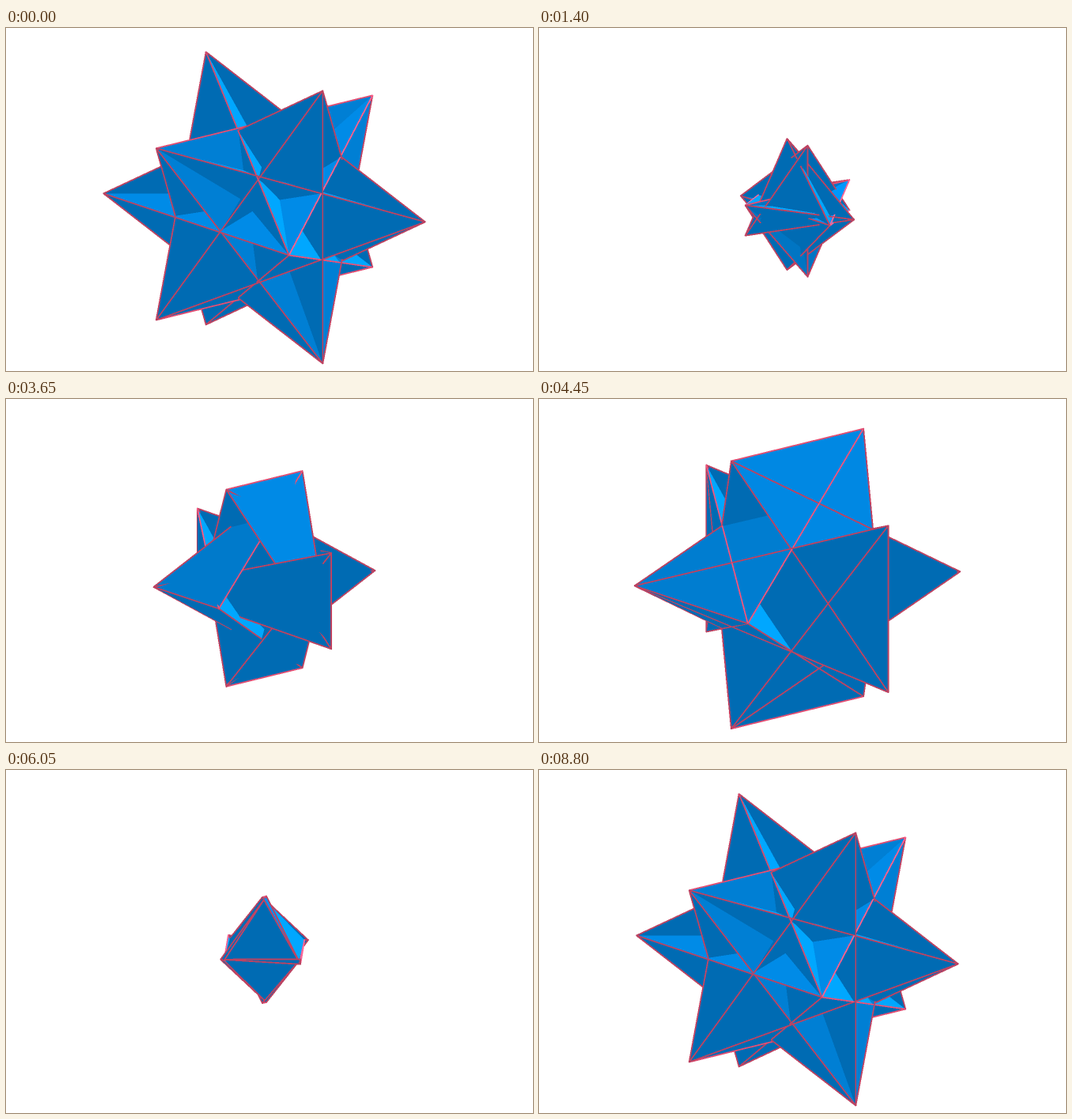
An HTML page with a canvas that plays this animation: 666 by 434 pixels, repeating every 8.85 s.

```html
<!DOCTYPE html>
<html>
<head>
<meta charset="utf-8">
<style>
html, body { margin: 0; width: 100%; height: 100%; overflow: hidden; background: #fff; }
canvas { display: block; width: 666px; height: 434px; }
</style>
</head>
<body>
<canvas id="stage" width="666" height="434"></canvas>
<script>
const W = 666, H = 434, SS = 2;
const FRAME_MS = 50, FRAMES = 177, TURN = 88;
const P_START = -1.7, P_STEP = 0.05;
const CENTER = [326.5, 227.4], SCALE = 66.7;
const LINE_WIDTH = 1.8, LINE_BIAS = 2;
const FACE_COLOR = [0, 153, 255], LINE_COLOR = [270, 95, 140];
const LIGHT = [0.36, 0, 0.36], AMBIENT = 0.7, MAX_LEVEL = 1.09;
const SIGNS = [-1, 1];

const az = 40.6 * Math.PI / 180, el = 16.6 * Math.PI / 180;
const RIGHT = [Math.cos(az), Math.sin(az), 0];
const DOWN = [-Math.sin(el) * Math.sin(az), Math.sin(el) * Math.cos(az), -Math.cos(el)];
const VIEW = [-Math.cos(el) * Math.sin(az), Math.cos(el) * Math.cos(az), Math.sin(el)];

const view = document.getElementById("stage").getContext("2d");
view.imageSmoothingQuality = "high";
const buffer = document.createElement("canvas");
const BW = buffer.width = W * SS, BH = buffer.height = H * SS;
const bufferCtx = buffer.getContext("2d");
const image = bufferCtx.createImageData(BW, BH);
const pixels = new Uint32Array(image.data.buffer);
const depth = new Float32Array(BW * BH);

function dot(a, b) {
  return a[0] * b[0] + a[1] * b[1] + a[2] * b[2];
}

function project(v) {
  return [
    SS * (CENTER[0] + SCALE * dot(v, RIGHT)),
    SS * (CENTER[1] + SCALE * dot(v, DOWN)),
    SS * SCALE * dot(v, VIEW)
  ];
}

// A point on an extended octahedron edge: axis i and the axis before it.
function vertex(p, i, s, t) {
  const v = [0, 0, 0];
  v[i] = (1 - p) * s;
  v[(i + 2) % 3] = p * t;
  return v;
}

// Packed color of a surface whose normal is turned towards the viewer.
function shade(color, normal) {
  const side = Math.sign(dot(normal, VIEW)) / (Math.hypot(...normal) || 1);
  const level = Math.min(MAX_LEVEL, AMBIENT + Math.max(0, dot(normal, LIGHT) * side));
  const [r, g, b] = color.map(c => Math.min(255, Math.round(c * level)));
  return (255 << 24 | b << 16 | g << 8 | r) >>> 0;
}

// Depth-tested fill of a flat convex polygon.
function fill(points, color, bias) {
  const [a, b, c] = points;
  const ux = b[0] - a[0], uy = b[1] - a[1], uz = b[2] - a[2];
  const vx = c[0] - a[0], vy = c[1] - a[1], vz = c[2] - a[2];
  const area = ux * vy - uy * vx;
  if (Math.abs(area) < 1e-3) return;
  const gx = (uz * vy - uy * vz) / area;
  const gy = (ux * vz - uz * vx) / area;
  const ys = points.map(q => q[1]);
  const top = Math.max(0, Math.ceil(Math.min(...ys) - 0.5));
  const bottom = Math.min(BH - 1, Math.floor(Math.max(...ys) - 0.5));
  for (let y = top; y <= bottom; y++) {
    const cy = y + 0.5;
    let left = Infinity, right = -Infinity;
    for (let i = 0; i < points.length; i++) {
      const m = points[i], n = points[(i + 1) % points.length];
      if ((m[1] <= cy) === (n[1] <= cy)) continue;
      const x = m[0] + (cy - m[1]) / (n[1] - m[1]) * (n[0] - m[0]);
      left = Math.min(left, x);
      right = Math.max(right, x);
    }
    const x0 = Math.max(0, Math.ceil(left - 0.5));
    const x1 = Math.min(BW - 1, Math.ceil(right - 0.5) - 1);
    let z = a[2] + gx * (x0 + 0.5 - a[0]) + gy * (cy - a[1]) + bias;
    for (let x = x0, k = y * BW + x0; x <= x1; x++, k++, z += gx) {
      if (z > depth[k]) {
        depth[k] = z;
        pixels[k] = color;
      }
    }
  }
}

function drawFace(vertices, normal) {
  fill(vertices.map(project), shade(FACE_COLOR, normal), 0);
}

// An edge is lit like a thin rod seen from the front.
function drawEdge(from, to) {
  const a = project(from), b = project(to);
  const dx = b[0] - a[0], dy = b[1] - a[1], length = Math.hypot(dx, dy);
  if (length < 1e-3) return;
  const along = to.map((c, i) => c - from[i]);
  const slant = dot(along, VIEW) / dot(along, along);
  const normal = VIEW.map((c, i) => c - slant * along[i]);
  const half = SS * LINE_WIDTH / 2;
  const ex = dx / length * half, ey = dy / length * half;
  const corner = (q, end, side) =>
    [q[0] + end * ex * 0.6 - side * ey, q[1] + end * ey * 0.6 + side * ex, q[2]];
  fill([corner(a, -1, -1), corner(a, -1, 1), corner(b, 1, 1), corner(b, 1, -1)],
    shade(LINE_COLOR, normal), SS * LINE_BIAS);
}

function drawSolid(p) {
  const edges = [];

  for (const x of SIGNS) for (const y of SIGNS) for (const z of SIGNS) {
    const s = [x, y, z];
    const face = s.map((sign, i) => vertex(p, i, sign, s[(i + 2) % 3]));
    drawFace(face, s);
    face.forEach((v, i) => edges.push([v, face[(i + 1) % 3]]));
  }

  for (let i = 0; i < 3; i++) for (const t of SIGNS) {
    const base = SIGNS.map(s => vertex(p, i, s, t));
    edges.push(base);
    for (const s of SIGNS) {
      const normal = [0, 0, 0];
      normal[(i + 1) % 3] = (2 * p - 1) * s;
      normal[(i + 2) % 3] = p * t;
      drawFace([...base, vertex(p, (i + 2) % 3, t, s)], normal);
    }
  }

  edges.forEach(([a, b]) => drawEdge(a, b));
}

function render(frame) {
  const step = frame <= TURN ? frame : 2 * TURN - frame;
  pixels.fill(0xffffffff);
  depth.fill(-1e9);
  drawSolid(P_START + P_STEP * step);
  bufferCtx.putImageData(image, 0, 0);
  view.drawImage(buffer, 0, 0, W, H);
}

const start = performance.now();
let shown = -1;

function tick() {
  const elapsed = Math.max(0, performance.now() - start);
  const frame = Math.floor(elapsed / FRAME_MS) % FRAMES;
  if (frame !== shown) render(shown = frame);
  requestAnimationFrame(tick);
}
tick();
</script>
</body>
</html>
```
